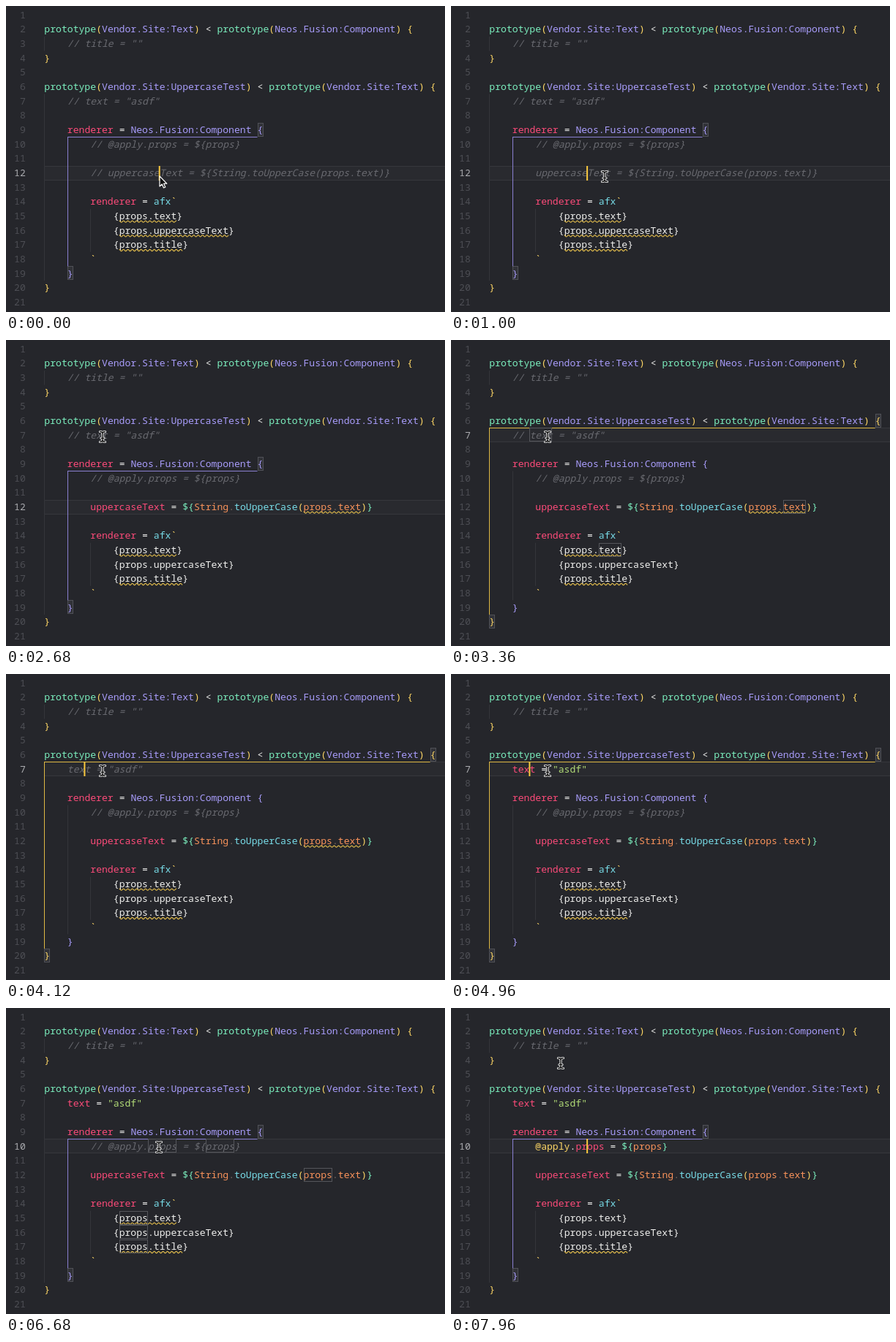
An HTML page with a canvas for the animation above (8 s loop, 600 by 419 pixels).

```html
<!DOCTYPE html>
<html lang="en">
<head>
<meta charset="utf-8">
<title>Editor</title>
<style>
  html, body { margin: 0; width: 100%; height: 100%; overflow: hidden; background: #25262b; }
  canvas { display: block; width: 600px; height: 419px; }
</style>
</head>
<body>
<canvas id="stage"></canvas>
<script>
const LOOP = 8000, LEFT = 52.3, ROW = 19.66, TOP = 2.5, SIZE = 13.12;
const CHAR = SIZE * 0.6;
const FONT = '500 ' + SIZE + 'px "Noto Sans Mono", "DejaVu Sans Mono", monospace';
const C = {
  back: '#25262b', mint: '#7bedbd', violet: '#a89cfa', gold: '#ffd866', pink: '#fc4b79',
  cyan: '#78dce8', orange: '#f9935b', green: '#b2dc77', white: '#f0f0ee', dim: '#77685f',
  comment: '#696a70', number: '#4d4e54', active: '#a9aaae', guide: '#34353a',
  caret: '#f9c93f', squiggle: '#e3bd4c'
};

// When each comment is toggled, re-coloured and re-checked.
const EDITS = {
  12: { toggle: 720, color: 1120, check: 1360 },
  7:  { toggle: 3900, color: 4180, check: 4480 },
  10: { toggle: 6900, color: 7180, check: 7480 }
};
// Cursor placements: time, row, column and the word marked shortly after.
const CARETS = [
  { at: 0, row: 12, col: 20 },
  { at: 720, row: 12, col: 17 },
  { at: 2720, row: 7, col: 10, word: 'text' },
  { at: 3900, row: 7, col: 7 },
  { at: 5800, row: 10, col: 20, word: 'props' },
  { at: 6900, row: 10, col: 17 }
];
// Time, x, y
const MOUSE = [
  [0, 209, 233], [300, 210, 233], [1800, 210, 233], [2040, 208, 227], [2640, 132, 132],
  [5080, 132, 132], [5720, 209, 190], [7440, 209, 190], [7960, 150, 75]
];

const prototype = (name, base) => [
  'mint', 'prototype', 'gold', '(', 'violet', name, 'gold', ')', 'white', ' < ',
  'mint', 'prototype', 'gold', '(', 'violet', base, 'gold', ')', 'gold', ' {'
];
const LINES = {
  2: [0, ...prototype('Vendor.Site:Text', 'Neos.Fusion:Component')],
  3: [4, 'comment', '// title = ""'],
  4: [0, 'gold', '}'],
  6: [0, ...prototype('Vendor.Site:UppercaseTest', 'Vendor.Site:Text')],
  7: [4, 'pink', 'text', 'white', ' = ', 'green', '"asdf"'],
  9: [4, 'pink', 'renderer', 'white', ' = ', 'violet', 'Neos.Fusion:Component {'],
  10: [8, 'gold', '@apply', 'white', '.', 'pink', 'props', 'white', ' = ',
    'mint', '${', 'orange', 'props', 'mint', '}'],
  12: [8, 'pink', 'uppercaseText', 'white', ' = ', 'mint', '${', 'orange', 'String', 'dim', '.',
    'cyan', 'toUpperCase', 'gold', '(', 'orange', 'props', 'dim', '.', 'orange', 'text',
    'gold', ')', 'mint', '}'],
  14: [8, 'pink', 'renderer', 'white', ' = ', 'cyan', 'afx', 'gold', '`'],
  15: [12, 'white', '{props.text}'],
  16: [12, 'white', '{props.uppercaseText}'],
  17: [12, 'white', '{props.title}'],
  18: [8, 'gold', '`'],
  19: [4, 'violet', '}'],
  20: [0, 'gold', '}']
};

const canvas = document.getElementById('stage');
const ctx = canvas.getContext('2d');
const ratio = window.devicePixelRatio || 1;
canvas.width = 600 * ratio;
canvas.height = 419 * ratio;

const colX = col => LEFT + col * CHAR;
const rowY = row => TOP + (row - 1) * ROW;

function rect(x, y, w, h, color) {
  ctx.fillStyle = color;
  ctx.fillRect(x, y, w, h);
}

function text(value, x, row, color, italic = false) {
  ctx.font = (italic ? 'italic ' : '') + FONT;
  ctx.fillStyle = color;
  ctx.fillText(value, x, Math.round(rowY(row) + ROW / 2 + 4.5));
}

function box(row, col, length, stroke, fill) {
  const x = Math.round(colX(col)), y = Math.round(rowY(row));
  const w = Math.round(length * CHAR);
  if (fill) rect(x, y, w, 19, fill);
  ctx.strokeStyle = stroke;
  ctx.lineWidth = 1;
  ctx.strokeRect(x + 0.5, y + 0.5, w - 1, 18);
}

function squiggle(row, col, length) {
  const start = colX(col), base = rowY(row) + 17.4;
  ctx.beginPath();
  for (let x = 0; x <= length * CHAR; x += 0.5)
    ctx.lineTo(start + x, base - 1.1 * Math.cos(x * Math.PI * 2 / 6));
  ctx.strokeStyle = C.squiggle;
  ctx.lineWidth = 1.1;
  ctx.stroke();
}

function guide(col, first, last, color = C.guide) {
  rect(Math.round(colX(col)), rowY(first), 1, rowY(last + 1) - rowY(first), color);
}

function bracketPair(first, last, col, openCol, color) {
  box(first, openCol, 1, '#505157', '#313238');
  box(last, col, 1, '#505157', '#313238');
  guide(col, first + 1, last - 1, color);
  const x = Math.round(colX(col));
  rect(x, Math.round(rowY(first + 1)), colX(openCol) - x, 1, color);
}

function plainText(row) {
  return LINES[row].slice(1).filter((_, i) => i % 2).join('');
}

function drawLine(row, t) {
  const [indent, ...tokens] = LINES[row];
  const edit = EDITS[row];
  if (edit && t < edit.color) {
    const prefix = t < edit.toggle ? '// ' : '';
    text(prefix + plainText(row), colX(indent), row, C.comment, true);
    return;
  }
  let col = indent;
  for (let i = 0; i < tokens.length; i += 2) {
    text(tokens[i + 1], colX(col), row, C[tokens[i]], tokens[i] === 'comment');
    col += tokens[i + 1].length;
  }
}

function markWord(word, t) {
  for (const row of [7, 10, 12, 15, 16, 17]) {
    const edit = EDITS[row];
    const prefix = edit && t < edit.toggle ? '// ' : '';
    const line = ' '.repeat(LINES[row][0]) + prefix + plainText(row);
    for (const match of line.matchAll(new RegExp('\\b' + word + '\\b', 'g')))
      box(row, match.index, word.length, '#55565b');
  }
}

function mouseAt(t) {
  const i = MOUSE.findIndex(key => key[0] > t);
  if (i < 0) return MOUSE[MOUSE.length - 1].slice(1);
  const [t0, x0, y0] = MOUSE[i - 1], [t1, x1, y1] = MOUSE[i];
  const p = (t - t0) / (t1 - t0), ease = p * p * (3 - 2 * p);
  return [x0 + (x1 - x0) * ease, y0 + (y1 - y0) * ease];
}

function drawMouse(t) {
  const [x, y] = mouseAt(t);
  ctx.save();
  ctx.translate(x, y);
  ctx.lineJoin = 'round';
  if (t < 300) {
    const arrow = new Path2D('M1 0V14L4.2 11L6.5 16L8.8 15L6.6 10.2H10.8Z');
    ctx.fillStyle = '#111';
    ctx.fill(arrow);
    ctx.strokeStyle = '#fff';
    ctx.lineWidth = 1.2;
    ctx.stroke(arrow);
  } else {
    const beam = new Path2D('M-3.5 -6.5Q0 -6.5 0 -4Q0 -6.5 3.5 -6.5M0 -4.5V5.5M-3.5 7.5Q0 7.5 0 5Q0 7.5 3.5 7.5M-2 2.5H2');
    ctx.lineCap = 'round';
    for (const [width, color] of [[3.2, '#fff'], [1.4, '#111']]) {
      ctx.lineWidth = width;
      ctx.strokeStyle = color;
      ctx.stroke(beam);
    }
  }
  ctx.restore();
}

function draw(t) {
  ctx.setTransform(ratio, 0, 0, ratio, 0, 0);
  rect(0, 0, 600, 419, C.back);
  const caret = CARETS.filter(c => c.at <= t).pop();

  const y = Math.round(rowY(caret.row));
  rect(52, y, 548, 20, '#36373c');
  rect(53, y + 1, 547, 18, '#292a2f');

  guide(0, 3, 3);
  guide(0, 7, 19);
  guide(4, 10, 18);
  guide(8, 15, 17);
  if (caret.row === 7) bracketPair(6, 20, 0, 67, '#dfb944');
  else bracketPair(9, 19, 4, 37, '#8a80d2');

  ctx.textAlign = 'right';
  for (let row = 1; row <= 21; row++)
    text(row, 26.8, row, row === caret.row ? C.active : C.number);
  ctx.textAlign = 'left';
  for (const row of Object.keys(LINES)) drawLine(+row, t);

  if (t >= EDITS[12].check && t < EDITS[7].check) squiggle(12, 45, 10);
  if (t < EDITS[10].check) squiggle(15, 13, 10);
  if (t < EDITS[12].check) squiggle(16, 13, 19);
  squiggle(17, 13, 11);

  const age = t - caret.at;
  if (caret.word && age >= 250) markWord(caret.word, t);
  if (age % 1000 < 500) rect(colX(caret.col) - 1, y, 2, 20, C.caret);
  drawMouse(t);
}

function frame() {
  draw(performance.now() % LOOP);
  requestAnimationFrame(frame);
}
frame();
</script>
</body>
</html>
```
